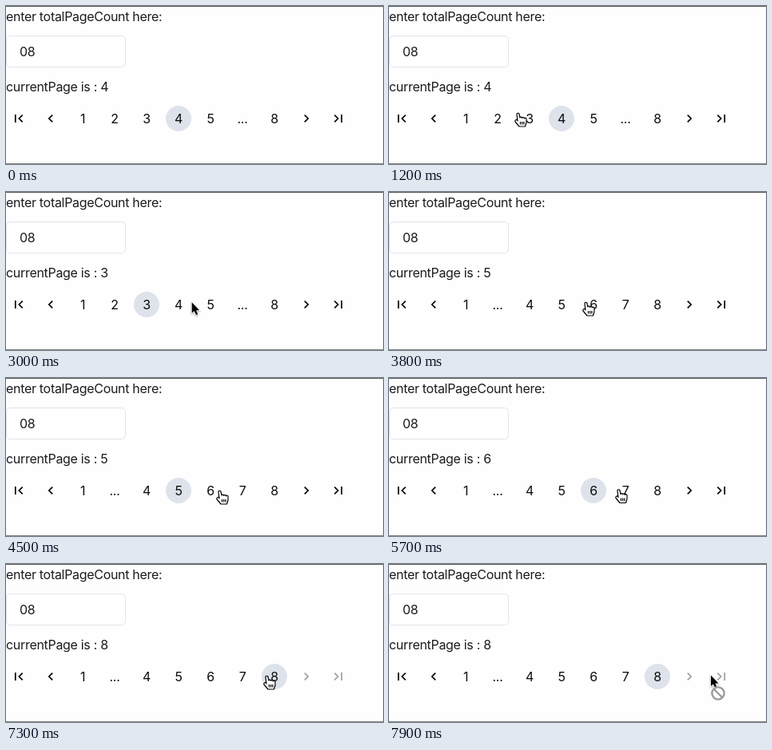
These frames come from a looping animation (472 by 198 pixels, 8 s). An HTML page:

```html
<!DOCTYPE html>
<html lang="en">
<head>
<meta charset="utf-8">
<title>Pagination</title>
<style>
  html, body { margin: 0; width: 100%; height: 100%; overflow: hidden; background: #fefefe; }
  svg { display: block; }
  text { font: 16px Inter, sans-serif; letter-spacing: -.31px; fill: #1b1b1f; }
  #labels text { text-anchor: middle; fill: #0c0c0e; }
  .icon { fill: none; stroke: #000; stroke-width: 1.67; }
</style>
</head>
<body>
<svg width="472" height="198" viewBox="0 0 472 198">
  <defs>
    <path id="prev" class="icon" d="M2.2-4.4L-2.2 0L2.2 4.4"/>
    <g id="first">
      <use href="#prev" x="2.5"/>
      <path class="icon" d="M-4.2-5V5"/>
    </g>
  </defs>
  <path d="M0 .5H472" stroke="#5a5a5a"/>
  <path d="M0 197.5H472" stroke="#858585"/>
  <text y="19">enter totalPageCount here:</text>
  <rect x=".5" y="37.5" width="149" height="39" rx="5" fill="#fff" stroke="#e1e3ea"/>
  <text x="17" y="63">08</text>
  <text id="status" y="107"></text>

  <circle id="selected" cy="141" r="16" fill="#dee2eb"/>
  <g id="labels"></g>
  <use href="#first" x="16" y="141"/>
  <use href="#prev" x="56" y="141"/>
  <g id="forward">
    <use href="#prev" transform="translate(376 141) scale(-1 1)"/>
    <use href="#first" transform="translate(416 141) scale(-1 1)"/>
  </g>

  <g id="cursor">
    <g id="hand" stroke="#000" stroke-width="1.2" stroke-linejoin="round">
      <path fill="#fff" d="M-1 10L-2 2a1.5 1.5 0 0 1 3-.5L2 6a1.4 1.4 0 0 1 2.7.4a1.4 1.4 0 0 1 2.7.6a1.4 1.4 0 0 1 2.6 1V12L8.5 17H1L-4 11a1.5 1.5 0 0 1 3-1.5z"/>
      <path d="M2.5 11v3.5m2.2-3.5v3.5m2.2-3.5v3.5"/>
    </g>
    <path id="arrow" d="M.5 .5V14L3.5 11.5L6 16.5L8 15.5L6 10.5H10Z" stroke="#fff" stroke-width="1.6" paint-order="stroke" style="filter:drop-shadow(0 1px 1px #0005)"/>
    <g id="denied" transform="translate(9.5 23)" stroke="#9c9c9c" stroke-width="2.4">
      <circle r="9" fill="#e9e9e9" stroke="none"/>
      <circle r="7.6" fill="#fff"/>
      <path d="M-5-5L5 5"/>
    </g>
  </g>
</svg>
<script>
const $ = id => document.getElementById(id);
const LOOP = 8000, STEP = 100, FADE = 200, TOTAL = 8;

// [time, page]
const clicks = [[-FADE, 4], [2100, 3], [3800, 5], [5000, 6], [7100, TOTAL]];

// Pointer glides: [start, end, x, y]
const entry = { time: 800, x: 185, y: 156 };
const glides = [
  [800, 1200, 162, 134], [1400, 1700, 172, 137], [2500, 3400, 247, 138],
  [4100, 4500, 268, 141], [5400, 5700, 288, 139.5], [5700, 6000, 317, 143],
  [6300, 6800, 327, 140], [7400, 7900, 402.5, 139]
];

const clamp = v => Math.max(0, Math.min(1, v));
const easeOut = p => 1 - (1 - p) ** 2;
const slotX = i => 96 + 40 * i;
const show = (id, on) => $(id).setAttribute('display', on ? 'inline' : 'none');

// All pages, with two neighbours on the far side collapsed into dots
function labelsFor(page) {
  const dots = page <= TOTAL / 2 ? TOTAL - 2 : 2;
  return Array.from({ length: TOTAL }, (_, i) => i + 1)
    .filter(n => n !== dots + 1)
    .map(n => n === dots ? '...' : n);
}
const slotOf = page => labelsFor(page).indexOf(page);

$('labels').innerHTML = labelsFor(1).map((_, i) => `<text x="${slotX(i)}" y="147"></text>`).join('');
const labels = [...$('labels').children];

function pointerAt(t) {
  let { x, y } = entry;
  for (const [start, end, toX, toY] of glides) {
    const p = easeOut(clamp((t - start) / (end - start)));
    x += (toX - x) * p;
    y += (toY - y) * p;
  }
  return [x, y];
}

function drawPages(t) {
  const [[since, page], before] = clicks.filter(c => c[0] <= t).reverse();
  const slot = slotOf(page);
  const sameSlot = before && slotOf(before[1]) === slot;
  const fade = sameSlot ? 1 : clamp((t - since) / FADE);
  const atEnd = page === TOTAL;
  labelsFor(page).forEach((label, i) => labels[i].textContent = label);
  $('status').textContent = `currentPage is : ${page}`;
  $('selected').setAttribute('cx', slotX(slot));
  $('selected').setAttribute('opacity', fade);
  $('forward').setAttribute('opacity', atEnd ? 1 - .62 * fade : 1);
  return atEnd;
}

function drawPointer(t, atEnd) {
  const [x, y] = pointerAt(t);
  const overButton = x % 40 <= 32 && y < entry.y;
  const denied = overButton && atEnd && x >= 360;
  show('cursor', t >= entry.time);
  show('hand', overButton && !denied);
  show('arrow', !overButton || denied);
  show('denied', denied);
  $('cursor').setAttribute('transform', `translate(${x} ${y})`);
}

function frame() {
  const t = Math.floor(performance.now() % LOOP / STEP) * STEP;
  drawPointer(t, drawPages(t));
  requestAnimationFrame(frame);
}
frame();
</script>
</body>
</html>
```
